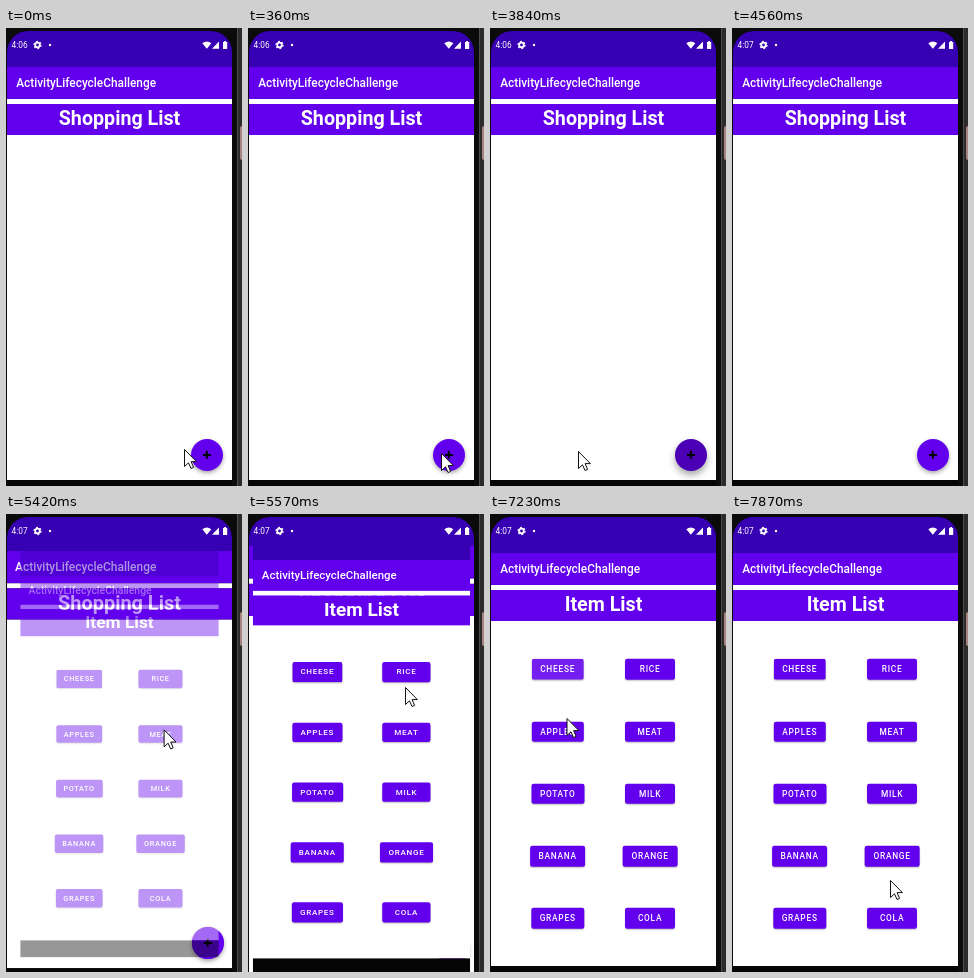
An HTML page that plays this animation: 236 by 458 pixels, repeating every 7.99 s.

```html
<!DOCTYPE html>
<html lang="en">
<head>
<meta charset="utf-8">
<title>Shopping list app</title>
<style>
  html, body { margin: 0; width: 100%; height: 100%; overflow: hidden; background: #0b0b0b; }
  body { position: relative; font-family: Roboto, sans-serif; color: #fff; }
  div, svg { position: absolute; box-sizing: border-box; }
  .bezel { left: 231px; top: 0; width: 5px; height: 458px; background: #2b2b2b; border-left: 1px solid #4c4c4c; }
  .key { left: 234px; top: 98px; width: 2px; height: 34px; background: #a88480; border-radius: 2px 0 0 2px; }
  .screen { left: 1px; top: 3px; width: 225px; height: 455px; overflow: hidden; border-radius: 21px 21px 0 0; background: #000; }
  .window { left: 0; top: 0; width: 225px; height: 468px; }
  .window > * { left: 0; width: 225px; }
  .status { top: 0; height: 36px; background: #3700b3; }
  .toolbar { top: 36px; height: 32px; padding-left: 9.2px; background: #6200ee; font: 500 11.85px/33px Roboto, sans-serif; }
  .gap { top: 68px; height: 5px; background: #fff; }
  .header { top: 73px; height: 31px; background: #6200ee; font: 700 19.7px/29px Roboto, sans-serif; text-align: center; }
  .content { top: 104px; height: 345px; background: #fff; }
  .nav { top: 449px; height: 19px; background: #050505; }
  .button {
    height: 20.6px; min-width: 50px; padding: 0 8.7px; border-radius: 2.3px;
    transform: translate(-50%, -50%); background-color: #6200ee; box-shadow: 0 1px 1.5px #0004;
    font: 500 8.35px/21.6px Roboto, sans-serif; letter-spacing: .0893em; text-align: center; white-space: nowrap;
  }
  .fab { left: 184px; top: 304px; width: 32px; height: 32px; border-radius: 50%; }
  .fab::before, .fab::after { content: ""; position: absolute; left: 12px; top: 15.2px; width: 8px; height: 1.6px; background: #000; }
  .fab::after { transform: rotate(90deg); }
  #clock { left: 5.6px; top: 12px; font-size: 8.3px; line-height: 11px; }
  .overlay { left: 0; top: 0; }
</style>
</head>
<body>
<div class="bezel"></div>
<div class="key"></div>
<div class="screen" id="screen"></div>
<div id="clock"></div>
<svg class="overlay" width="236" height="458" fill="#fff">
  <circle cx="31.5" cy="17" r="2.3" fill="none" stroke="#fff" stroke-width="1.8"/>
  <circle cx="31.5" cy="17" r="3.5" fill="none" stroke="#fff" stroke-width="1.3" stroke-dasharray="1.83"/>
  <circle cx="44" cy="17" r="1.2"/>
  <path d="M196.3 15.2Q200.8 11.6 205.3 15.2L200.8 20.8Z"/>
  <path d="M206 20.8H213V13.6Z"/>
  <path d="M217 14H218.2V13H220V14H221.2V21H217Z"/>
  <path id="cursor" d="M.5 .5V17.5L4.5 13.8L7 19.5L9.6 18.4L7.1 12.6H12.4Z" stroke="#111" stroke-linejoin="round"/>
</svg>
<script>
const LOOP = 7990;
const STEP = 120;
const PRESS = 3230, RELEASED = 4560, RETURN = 5060, OPEN = 5420, TAP = 6730;

// Cursor strokes: start time, number of steps, end point
const start = { x: 178, y: 421 };
const strokes = [
  [120, 3, 193, 425],
  [2700, 1, 197, 429],
  [PRESS, 2, 183, 438],
  [3480, 4, 88, 423],
  [3960, 3, 50, 300],
  [4320, 2, 160, 385],
  [RETURN, 5, 157, 173],
  [5690, 1, 186, 157],
  [5940, 4, 75, 154],
  [7110, 4, 78, 254],
  [7620, 3, 158, 366],
];

const byId = id => document.getElementById(id);
const clamp = v => Math.min(1, Math.max(0, v));

function add(parent, className, text = "") {
  const node = document.createElement("div");
  node.className = className;
  node.textContent = text;
  return parent.appendChild(node);
}

function addWindow(title) {
  const root = add(byId("screen"), "window");
  add(root, "status");
  add(root, "toolbar", "ActivityLifecycleChallenge");
  add(root, "gap");
  add(root, "header", title);
  const content = add(root, "content");
  add(root, "nav");
  return { root, content };
}

const home = addWindow("Shopping List");
const fab = add(home.content, "fab");
const items = addWindow("Item List");
const buttons = "CHEESE RICE APPLES MEAT POTATO MILK BANANA ORANGE GRAPES COLA".split(" ").map((name, i) => {
  const button = add(items.content, "button", name);
  button.style.left = 66.7 + 92.4 * (i % 2) + "px";
  button.style.top = 48.4 + 62.2 * (i >> 1) + "px";
  return button;
});

function cursorAt(t) {
  let { x, y } = start;
  for (const [begin, steps, endX, endY] of strokes) {
    if (t < begin) break;
    const part = Math.min(1, (1 + Math.floor((t - begin) / STEP)) / steps);
    x += (endX - x) * part;
    y += (endY - y) * part;
  }
  return `translate(${x} ${y})`;
}

// The window transition is seen in coarse steps of a decelerating curve.
function openProgress(t) {
  if (t < OPEN) return 0;
  const held = OPEN + 150 * Math.floor((t - OPEN) / 150);
  return 1 - (1 - clamp((held - OPEN + 45) / 315)) ** 1.5;
}

function render(now) {
  const t = now % LOOP;
  const cursor = byId("cursor");
  cursor.setAttribute("transform", cursorAt(t));
  cursor.style.opacity = t < RELEASED || t >= RETURN ? 1 : 0;
  byId("clock").textContent = t < 3960 ? "4:06" : "4:07";

  const press = clamp((t - PRESS + STEP) / 360) * clamp((RELEASED - t) / 480);
  fab.style.background = `linear-gradient(rgba(0,0,0,${0.24 * press}) 0 0), #6200ee`;
  fab.style.boxShadow = `0 ${2 + 2 * press}px ${4 + 3 * press}px rgba(0,0,0,.35)`;

  const p = openProgress(t);
  home.root.style.transform = `scale(${1 + 0.05 * p})`;
  items.root.style.transform = p < 1 ? `scale(${0.85 + 0.15 * p})` : "none";
  items.root.style.opacity = clamp(2 * p);

  const radius = t < TAP ? 0 : 16 + (t - TAP) / 5;
  const tint = `rgba(255,255,255,${radius ? 0.24 * clamp((7470 - t) / 480) : 0})`;
  buttons[0].style.backgroundImage = `radial-gradient(circle at 33px 10px, ${tint} ${radius}px, transparent ${radius + 1}px)`;

  requestAnimationFrame(render);
}
requestAnimationFrame(render);
</script>
</body>
</html>
```
